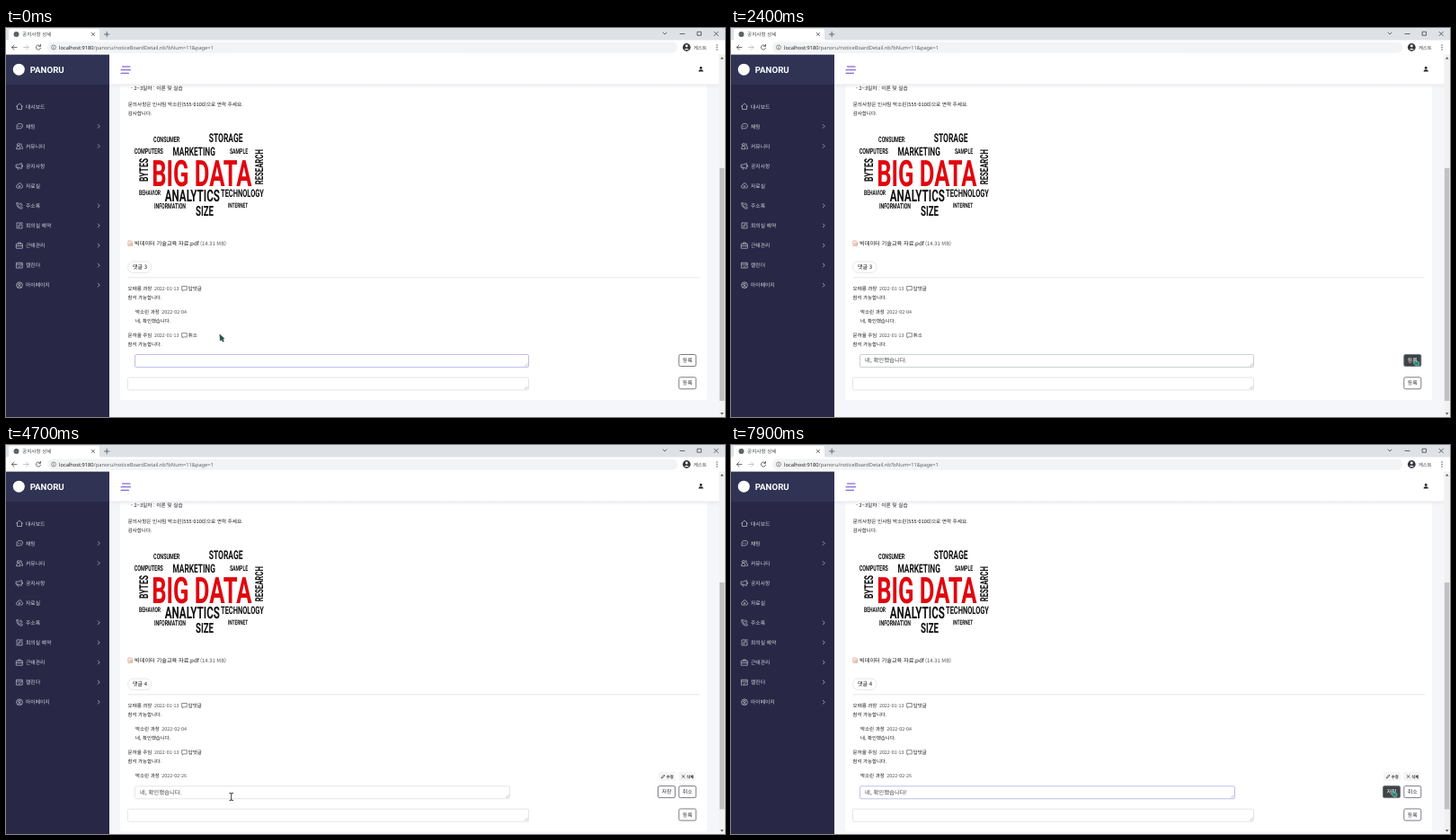
An HTML page that plays this animation: 800x433 px, repeating every 8 s.

```html
<!DOCTYPE html>
<html lang="ko">
<head>
<meta charset="utf-8">
<title>공지사항 상세</title>
<style>
html, body { margin: 0; height: 100%; overflow: hidden; background: #fff; }
svg { display: block; width: 100vw; height: 100vh; font-family: "Noto Sans CJK KR", "Noto Sans CJK", "Noto Sans", sans-serif; text-rendering: geometricPrecision; }
.line { fill: none; stroke-linecap: round; stroke-linejoin: round; }
.cloud { font-family: Roboto, sans-serif; font-weight: 700; text-anchor: middle; }
</style>
</head>
<body>
<svg id="stage" viewBox="0 0 800 433" preserveAspectRatio="none"></svg>
<script>
const text = (s, x, y, size = 5.5, fill = '#161616', extra = '') =>
  `<text x="${x}" y="${y}" font-size="${size}" fill="${fill}" ${extra}>${s}</text>`;
const rect = (x, y, w, h, fill, extra = '') =>
  `<rect x="${x}" y="${y}" width="${w}" height="${h}" fill="${fill}" ${extra}/>`;
const line = (d, stroke, width = .8, extra = '') =>
  `<path class="line" d="${d}" stroke="${stroke}" stroke-width="${width}" ${extra}/>`;
const dot = (x, y, r, fill, extra = '') => `<circle cx="${x}" cy="${y}" r="${r}" fill="${fill}" ${extra}/>`;
const group = (id, body, extra = '') => `<g id="${id}" ${extra}>${body}</g>`;

const idle = '#e0e2e7', active = '#b6b7ec';
const area = (x, y, right, stroke, id = '') =>
  rect(x, y, right - x, 14, '#fff', `rx="1.5" stroke="${stroke}" stroke-width=".9" id="${id}"`) +
  line(`M${right - 4} ${y + 12.8}l2.8-2.8M${right - 2} ${y + 12.8}l.8-.8`, '#888', .5);
const button = (label, x, y, id = '') => group(id,
  rect(x, y, 19, 13, '#fff', 'rx="1.6" stroke="#6a6f75" stroke-width=".9"') +
  text(label, x + 9.5, y + 8.6, 6, '#333', 'text-anchor="middle"'));
const bubble = (x, y) => line(`M${x} ${y - 2.2}h5.3v4.2h-3.6l-1.2 1.1v-1.1h-.5z`, '#444', .6);
const comment = (x, y, name, date, body) =>
  text(name, x, y + 2) + text(date, x + 29.3, y + 2, 5.4, '#555') + text(body, x, y + 11.8, 5.4);

// Browser frame
const browser = () =>
  rect(0, 0, 800, 14, '#dee1e6') +
  '<path d="M1 14q2 0 2-2V3q0-2 2-2h97q2 0 2 2v9q0 2 2 2z" fill="#fff"/>' +
  dot(11.5, 7, 3, '#5f6368') + text('공지사항 상세', 18, 9, 5.6, '#3c4043') +
  line('M95.2 5.2l3.4 3.4m0-3.4l-3.4 3.4M109.5 7h5.4M112.2 4.3v5.4', '#3c4043', .7) +
  line('M731 5l2 2 2-2M750 6.5h5M769.5 4.2h4v4h-4zM788 4.2l4.4 4.4m0-4.4l-4.4 4.4', '#333', .7) +
  rect(0, 13.5, 800, 16, '#fff') + rect(46, 15.5, 701, 12.2, '#f1f3f4', 'rx="6"') +
  line('M12 21.5H6.5m2.5-2.5l-2.5 2.5 2.5 2.5', '#4b4f54') +
  line('M19.5 21.5H25m-2.5-2.5l2.5 2.5-2.5 2.5', '#b5b8bc') +
  line('M38.2 20a2.6 2.6 0 1 0 .4 2.3M38.5 18.3v2h-2', '#4b4f54') +
  dot(53, 21.5, 2.5, 'none', 'stroke="#555" stroke-width=".6"') + line('M53 21.3v1.5M53 20.1v.1', '#555', .6) +
  text('localhost:9180<tspan fill="#5f6368">/panoru/noticeBoardDetail.nb?bNum=11&amp;page=1</tspan>', 59, 23.6, 5.7, '#222', 'style="font-family:Noto Sans,sans-serif"') +
  dot(757.3, 21.5, 4.4, '#33363b') + dot(757.3, 20, 1.4, '#fff') + '<path d="M754.5 24.2q2.8-3 5.6 0z" fill="#fff"/>' +
  text('게스트', 765, 23.6, 5.3, '#333') + [19, 21.5, 24].map(y => dot(791, y, .65, '#444')).join('');

const icons = [
  'M-3.5 0L0-3.3 3.5 0M-2.5-.8V3.2h5V-.8',
  'M-3 2.6Q-4-3 0-3Q4-3 3.5 0Q3 3-1.2 2.5zM-1.6-.1h.1M0-.1h.1M1.6-.1h.1',
  'M-3.4 2.8q0-3 2.2-3t2.2 3zM-2.6-1.6a1.4 1.4 0 1 0 2.8 0a1.4 1.4 0 1 0-2.8 0M1.2-3q2 .3.6 2.5q1.7.3 1.7 3.3h-1.2',
  'M-3.5-1.5h2.2l3.6-1.5v6l-3.6-1.5h-2.2zM-2.4 1.5l.6 2h1M3.5-.8v1.6',
  'M-1.5 2.5h-.6q-1.5-.2-1.4-1.8t1.6-1.7Q-1.4-3.2.4-3t2 2.1Q3.6-.6 3.5 1T1.8 2.5M0 3V0m-1.2 1L0-.1 1.2 1',
  'M-3.2-2.8l1.6-.5 1 2-1 .9q.6 1.6 2 2.1l1-.9 1.9 1.1-.6 1.5Q-3 3.3-3.2-2.8M.7-3q2.2.4 2.4 2.6M.7-1.5l.9.9',
  'M1-3h-4v6h6V-.5M-1.2 1l.3-1.3 3.5-3.2.9.9L0 .8z',
  'M-3.3-1.8h6.6v5h-6.6zM-1.3-1.8v-1.3h2.6v1.3M-3.3.5h6.6',
  'M-3.2-2.8h6.4v5.8h-6.4zM-3.2-1h6.4M-1.3 1l1 .9 1.7-1.5',
  'M-3.4 0a3.4 3.4 0 1 0 6.8 0a3.4 3.4 0 1 0-6.8 0M-1.3-.8a1.3 1.3 0 1 0 2.6 0a1.3 1.3 0 1 0-2.6 0M-2.2 2.4Q0-.1 2.2 2.4'
];
const menu = ['대시보드', '채팅', '커뮤니티', '공지사항', '자료실', '주소록', '회의실 예약', '근태관리', '캘린더', '마이페이지'];
const folded = [1, 2, 5, 6, 7, 8, 9];
const sidebar = () =>
  rect(0, 29.5, 115, 404, '#282846') + rect(0, 29.5, 115, 33.5, '#313355') +
  dot(14.3, 46.2, 6.5, '#fff') + text('PANORU', 26.7, 49.7, 9.7, '#fff', 'font-weight="700" style="font-family:Roboto,sans-serif"') +
  menu.map((name, i) => {
    const y = 87.3 + i * 22.1;
    return line(icons[i], '#c4c5d3', .7, `transform="translate(15 ${y})"`) + text(name, 22, y + 2.2, 5.8, '#d5d6e0') +
      (folded.includes(i) ? line(`M102.3 ${y - 1.9}l1.9 1.9-1.9 1.9`, '#c4c5d3', .7) : '');
  }).join('');

const header = () =>
  rect(115, 29.5, 678.5, 33, '#fff') +
  line('M129.5 43h8.5M128 46.7h10.5M128 50.3h8.5', '#6644cc', 1.1) +
  dot(773.2, 44.4, 1.4, '#222') + '<path d="M770.6 48.6q0-2.3 2.6-2.3t2.6 2.3z" fill="#222"/>';

// Words: label, centre x, centre y, size, turned
const words = [
  ['CONSUMER', 178.7, 124.3, 8.6], ['STORAGE', 244.6, 122, 13.5], ['COMPUTERS', 158.8, 137, 8.6],
  ['MARKETING', 209.2, 137, 13.2], ['SAMPLE', 259, 137, 8.2], ['BIG DATA', 217.8, 161.3, 40.6],
  ['BEHAVIOR', 160, 183, 7.9], ['ANALYTICS', 207.3, 186.3, 18.4], ['TECHNOLOGY', 263, 183.8, 11.8],
  ['INFORMATION', 182.5, 198.5, 8.3], ['SIZE', 221, 204, 15.4], ['INTERNET', 258, 197, 7.5],
  ['BYTES', 153.4, 158, 13.6, 1], ['RESEARCH', 281.3, 154.7, 12.3, 1]
];
const cloud = () => '<g class="cloud">' + words.map(([word, x, y, size, turned]) =>
  text(word, 0, size * .355, size, size > 40 ? '#e0070f' : '#111',
    `transform="translate(${x} ${y}) rotate(${turned ? -90 : 0}) scale(.63 1)"`)).join('') + '</g>';

const article = () =>
  text('- 2~3일차 : 이론 및 실습', 139, 69, 5.7) +
  text('문의사항은 인사팀 박소린(555-0100)으로 연락 주세요.', 135.7, 87, 5.6) +
  text('감사합니다.', 135.7, 97, 5.5) + cloud() +
  line('M136.3 237h3l1.3 1.3v4h-4.3zM137.3 240.7l1.5-2 .8 2z', '#c9805f', .6) +
  text('빅데이터 기술교육 자료.pdf', 143, 242, 6.2) + text('(14.31 MB)', 216, 242, 5.9, '#555') +
  rect(135.6, 260, 26.4, 12.5, '#fff', 'rx="6.2" stroke="#e2e3e6" stroke-width=".8"') +
  text('댓글 <tspan id="count">3</tspan>', 141, 268.4, 6) +
  line('M136 277.8H771.5', '#dcdde0', .7) +
  comment(135.6, 290, '오태룡 과장', '2022-01-13', '참석 가능합니다.') + bubble(196, 289.7) + text('답댓글', 202.7, 292) +
  comment(144, 316, '박소린 과장', '2022-02-04', '네, 확인했습니다.') +
  comment(135.6, 342.2, '문하율 주임', '2022-01-13', '참석 가능합니다.') + bubble(196, 341.9) +
  text('취소', 202.7, 344.2, 5.5, '#161616', 'id="toggle"');

const small = (label, x, icon) =>
  rect(x, 363.7, 18.7, 10.4, '#f4f5f7', 'rx="1.5"') + line(icon, '#333', .7, `transform="translate(${x + 5.2} 369)"`) +
  text(label, x + 8.8, 370.7, 4.3, '#222', 'font-weight="700"');
const field = (id, y) => text('', 149, y, 6.4, '#444', `id="${id}"`);

stage.innerHTML =
  '<defs><linearGradient id="shade" x2="0" y2="1"><stop stop-color="#e6e8ee"/><stop offset="1" stop-color="#e6e8ee" stop-opacity="0"/></linearGradient></defs>' +
  rect(115, 29.5, 678.5, 404, '#f5f6fa') + rect(127, 60, 653, 354, '#fff', 'rx="2" id="card"') +
  rect(115, 62, 678.5, 5, 'url(#shade)') + article() +
  group('reply', area(143.5, 363.5, 581.5, active, 'replyBox') + field('draft', 372.4) + button('등록', 748.8, 363.5, 'send')) +
  group('posted', comment(144, 368.4, '박소린 과장', '2022-02-26', '') + text('네, 확인했습니다.', 144, 380.2, 5.4, '#161616', 'id="answer"') +
    small('수정', 726, 'M-1.7 1.7l.4-1.3 2.3-2.3.9.9-2.3 2.3z') + small('삭제', 748.4, 'M-1.5-1.5l3 3m0-3l-3 3')) +
  group('edit', area(143.5, 379.8, 560.5, idle, 'editBox') + field('revision', 388.7) +
    button('저장', 725.5, 379.6, 'save') + button('취소', 748.8, 379.6)) +
  group('fresh', area(135.5, 389, 581.5, idle) + button('등록', 748.8, 388.8)) +
  rect(0, 0, .7, 7.6, '#222', 'id="caret"') +
  header() + sidebar() + browser() +
  rect(793.3, 29.5, 6.7, 404, '#f1f1f1') + rect(793.9, 156, 5.5, 259, '#c1c1c1', 'id="thumb"') +
  '<path d="M794.8 34.5l1.9-2.2 1.9 2.2zM794.8 428.3l1.9 2.2 1.9-2.2z" fill="#505050"/>' +
  group('mouse',
    '<path id="arrow" transform="scale(.85)" d="M0 0l.6 8.6 1.9-1.6 1.5 2.8 1.5-.8-1.5-2.7 2.2-.6z" fill="#24564c" stroke="#173a35" stroke-width=".5"/>' +
    '<path id="hand" transform="scale(.9)" d="M1 0q1 0 1 1v2.6l3.6.8q1 .4.8 1.5l-.5 3.1H2.2L-.8 5.6q.2-.9 1 .1V1Q.2 0 1 0z" fill="#278b76" stroke="#d5e5e0" stroke-width=".5"/>' +
    line('M-1.6-4h1.2l.6.5.6-.5H2M.2-3.5v7M-1.6 4h1.2l.6-.5.6.5H2', '#222', .9, 'id="beam"'));

const $ = id => document.getElementById(id);
const show = (id, on) => $(id).style.display = on ? '' : 'none';

// Korean keyboard input: initial, open syllable, closed syllable
const typed = message => {
  const steps = [''];
  let done = '';
  for (const ch of message) {
    const code = ch.charCodeAt(0) - 0xAC00;
    if (code >= 0) {
      steps.push(done + 'ㄱㄲㄴㄷㄸㄹㅁㅂㅃㅅㅆㅇㅈㅉㅊㅋㅌㅍㅎ'[code / 588 | 0]);
      if (code % 28) steps.push(done + String.fromCharCode(0xAC00 + code - code % 28));
    }
    steps.push(done += ch);
  }
  return steps;
};
const phrase = '네, 확인했습니다';
const keys = typed(phrase);

// Pointer stops: time, x, y
const stops = [
  [0, 237.8, 341], [1500, 237.8, 341], [1850, 760, 367.8], [2700, 760, 367.8], [3150, 212.5, 365],
  [3350, 212.5, 365], [3700, 738, 368], [3950, 738, 368], [4450, 250.5, 391.5], [5100, 250.5, 391.5],
  [5400, 265.7, 374], [6800, 265.7, 374], [7300, 735.3, 383.5], [8000, 735.3, 383.5]
];
const pointer = t => {
  const i = stops.findIndex(s => s[0] > t);
  const [t0, x0, y0] = stops[i - 1], [t1, x1, y1] = stops[i];
  const p = (t - t0) / (t1 - t0), e = p * p * (3 - 2 * p);
  return [x0 + (x1 - x0) * e, y0 + (y1 - y0) * e];
};
const hover = (id, on) => {
  $(id).children[0].setAttribute('fill', on ? '#3f4347' : '#fff');
  $(id).children[1].setAttribute('fill', on ? '#fff' : '#333');
};

function draw(t) {
  const state = t < 2600 ? 0 : t < 3950 ? 1 : 2;
  show('reply', state == 0);
  show('posted', state > 0);
  show('answer', state == 1);
  show('edit', state == 2);
  $('count').textContent = state ? 4 : 3;
  $('toggle').textContent = state ? '답댓글' : '취소';
  const drop = [0, 9.2, 16.2][state];
  $('fresh').setAttribute('transform', `translate(0 ${drop})`);
  $('card').setAttribute('height', 354 + drop);
  const [top, bottom] = [[156, 415], [154, 410], [153, 405.5]][state];
  $('thumb').setAttribute('y', top);
  $('thumb').setAttribute('height', bottom - top);

  const key = Math.max(0, Math.min(keys.length - 1, Math.floor((t - 90) / 60)));
  $('draft').textContent = t < 1480 ? keys[key] : phrase + '.';
  $('revision').textContent = phrase + (t < 5500 ? '.' : t < 6600 ? '' : '!');
  const focused = t >= 5100;
  $('replyBox').setAttribute('stroke', t < 1900 ? active : '#c6ccd0');
  $('editBox').setAttribute('stroke', focused ? active : idle);

  const input = $(state ? 'revision' : 'draft');
  show('caret', state ? focused && (t - 5100) % 1060 < 530 : t > 150 && t < 1850);
  $('caret').setAttribute('x', 149.1 + input.getComputedTextLength());
  $('caret').setAttribute('y', state ? 382.6 : 366.4);

  const [x, y] = pointer(t);
  const over = (left, right, up, down) => x > left && x < right && y > up && y < down;
  const onSend = state == 0 && over(749, 768, 363, 377);
  const onSave = state == 2 && over(725, 745, 379, 393);
  const onHand = onSend || onSave || state > 0 && over(726, 768, 363, 374.5);
  const onText = state == 0 ? over(144, 581, 363, 378) : state == 2 && over(144, 560, 379, 394);
  hover('send', onSend);
  hover('save', onSave);
  show('hand', onHand);
  show('beam', onText);
  show('arrow', !onHand && !onText);
  $('mouse').setAttribute('transform', `translate(${x} ${y})`);
}

const start = performance.now();
function tick() {
  draw((performance.now() - start) % 8000);
  requestAnimationFrame(tick);
}
tick();
</script>
</body>
</html>
```
